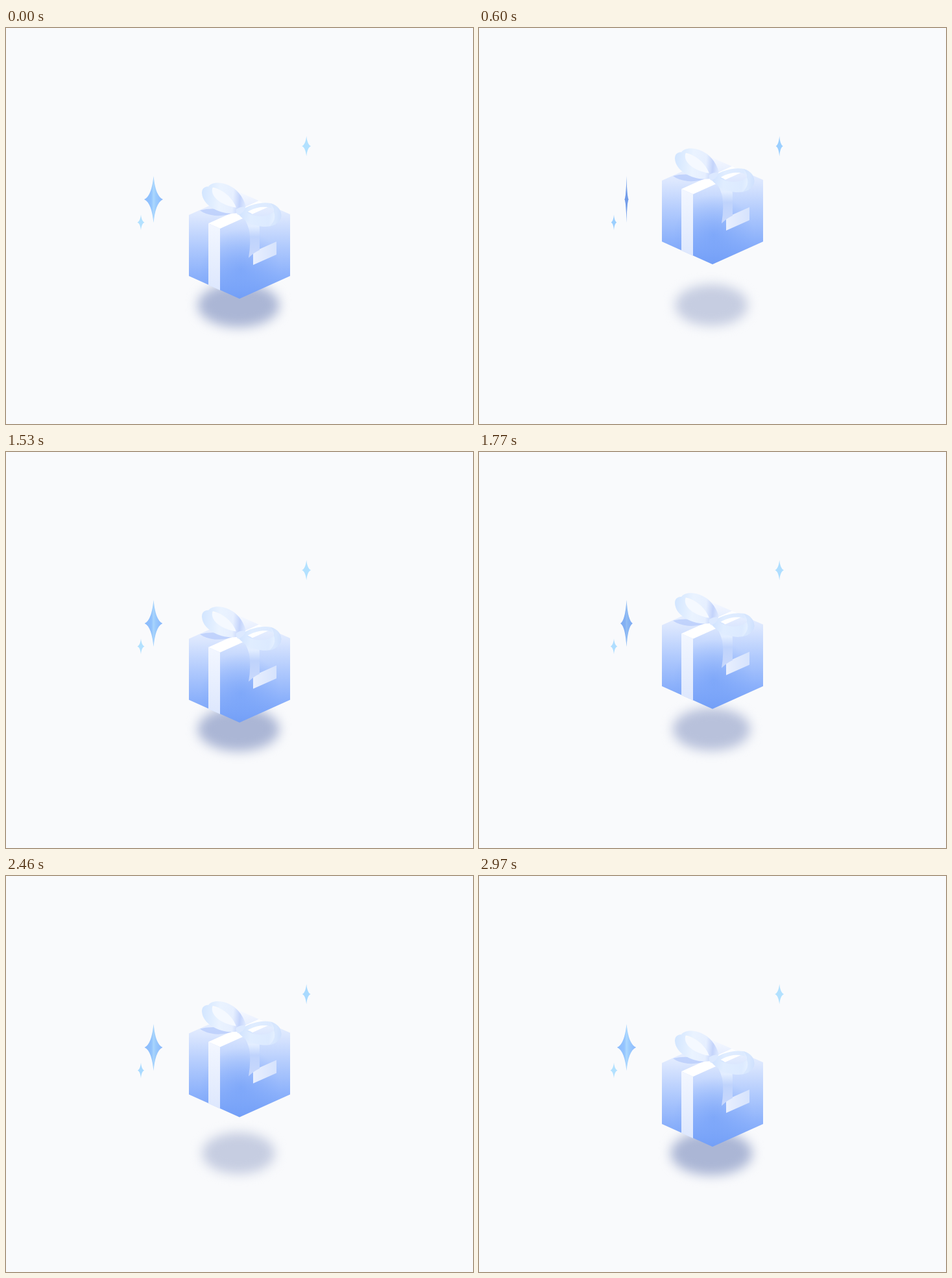
An HTML page that plays this animation: 720x610 px, repeating every 3000 ms.

```html
<!DOCTYPE html>
<html lang="en">
<head>
<meta charset="utf-8">
<title>Floating gift</title>
<style>
  html, body { margin: 0; width: 100%; height: 100%; overflow: hidden; background: #f9fafc; }
  svg { display: block; width: 720px; height: 610px; }
</style>
</head>
<body>
<svg viewBox="0 0 720 610">
  <defs>
    <filter id="soft" x="-40%" y="-60%" width="180%" height="220%" color-interpolation-filters="sRGB">
      <feGaussianBlur stdDeviation="8.5"/>
    </filter>
    <linearGradient id="body" gradientUnits="userSpaceOnUse" x1="0" y1="253" x2="0" y2="417">
      <stop offset="0" stop-color="#f5f8ff"/>
      <stop offset=".22" stop-color="#dce7fe"/>
      <stop offset=".5" stop-color="#b2cbfd"/>
      <stop offset=".78" stop-color="#8cb1fb"/>
      <stop offset="1" stop-color="#739ff7"/>
    </linearGradient>
    <radialGradient id="glow" gradientUnits="userSpaceOnUse" cx="362" cy="372" r="62">
      <stop offset="0" stop-color="#6f9df8" stop-opacity=".55"/>
      <stop offset="1" stop-color="#6f9df8" stop-opacity="0"/>
    </radialGradient>
    <linearGradient id="strip" x1="0" y1="0" x2="0" y2="1">
      <stop offset="0" stop-color="#f3f7ff"/>
      <stop offset="1" stop-color="#dde7fd"/>
    </linearGradient>
    <linearGradient id="tag" x1="0" y1="0" x2="1" y2="0">
      <stop offset="0" stop-color="#e8effe"/>
      <stop offset="1" stop-color="#d6e3fd"/>
    </linearGradient>
    <linearGradient id="tail" x1="0" y1="0" x2="0" y2="1">
      <stop offset="0" stop-color="#d4e5ff"/>
      <stop offset=".32" stop-color="#e3eeff"/>
      <stop offset=".55" stop-color="#bfd3fc"/>
      <stop offset="1" stop-color="#c8d8fc"/>
    </linearGradient>
    <linearGradient id="loopL" gradientUnits="userSpaceOnUse" x1="302" y1="262" x2="370" y2="268">
      <stop offset="0" stop-color="#d3e6ff"/>
      <stop offset=".4" stop-color="#eaf3ff"/>
      <stop offset=".7" stop-color="#e6efff"/>
      <stop offset=".86" stop-color="#c3d3fb"/>
      <stop offset="1" stop-color="#dfeaff"/>
    </linearGradient>
    <linearGradient id="loopR" gradientUnits="userSpaceOnUse" x1="358" y1="282" x2="425" y2="290">
      <stop offset="0" stop-color="#cfe2ff"/>
      <stop offset=".3" stop-color="#e0edff"/>
      <stop offset=".72" stop-color="#dceaff"/>
      <stop offset=".86" stop-color="#e6f1ff"/>
      <stop offset="1" stop-color="#c6dafc"/>
    </linearGradient>
    <linearGradient id="shine">
      <stop offset="0" stop-color="#8fbfff"/>
      <stop offset=".38" stop-color="#96c7ff"/>
      <stop offset=".5" stop-color="#b0dcff"/>
      <stop offset=".62" stop-color="#a0d0ff"/>
      <stop offset="1" stop-color="#8dbbff"/>
    </linearGradient>
    <path id="star" d="M0-36C2-18 6-4 15.5 0C6 4 2 18 0 36C-2 18-6 4-15.5 0C-6-4-2-18 0-36Z"/>
  </defs>

  <ellipse id="shadow" cx="358.5" cy="427" rx="63" ry="34" filter="url(#soft)"/>

  <g id="gift">
    <path id="box" d="M282 288L360 253L438 287V382L360 417L282 382Z" fill="url(#body)"/>
    <path d="M282 288L360 253L438 287V382L360 417L282 382Z" fill="url(#glow)"/>
    <path d="M312 301L390 266L408 274L330 309Z" fill="#fff"/>
    <path d="M312 301L330 309V404L312 396Z" fill="url(#strip)"/>
    <path d="M381 345L417 329V349L381 365Z" fill="url(#tag)"/>
    <path d="M299 281Q322 275 352 284Q340 290 322 289Q307 287 299 281Z" fill="#b9cefc" opacity=".8"/>
    <path d="M361 284Q374 278 387 294Q391 300 391 310V342Q382 346 374 354Q378 330 375 312Q371 296 361 284Z" fill="url(#tail)"/>
    <path d="M316 250C322 244 344 252 355 276C340 279 313 267 316 250Z" fill="#f5f9ff"/>
    <path d="M357 285C335 289 303 276 302 254C302 244 310 243 319 245C314 255 324 271 355 277C350 262 334 247 312 244
             C322 233 347 240 358 253Q366 262 370 275Z" fill="url(#loopL)"/>
    <path fill-rule="evenodd" d="M357 285C368 275 390 267 408 270C420 273 426 283 424 292C420 305 402 309 386 304C373 301 363 293 357 285Z
             M371 284C383 292 404 292 413 283C412 276 402 275 392 276Q380 278 371 284Z" fill="url(#loopR)"/>
    <path d="M408 270C420 273 426 283 424 292C421 301 413 305 406 306C414 299 416 291 413 283Q414 277 408 270Z" fill="#d2e3fe" opacity=".7"/>
    <path d="M355 279Q362 274 369 276Q368 284 358 288Q353 284 355 279Z" fill="#dce9ff"/>
  </g>

  <g id="big">
    <use href="#star" fill="url(#shine)"/>
    <use id="dim" href="#star" fill="#688fe2"/>
  </g>
  <use id="right" href="#star"/>
  <use id="left" href="#star"/>
</svg>
<script>
const $ = id => document.getElementById(id);
const LOOP = 3000, HOP = 1500, STEP = 30;

// [ms, value]
const lift = [[0, 0], [30, .3], [135, 6.5], [330, 28], [540, 50.5], [600, 53], [740, 55.5],
  [960, 45.5], [1080, 31], [1200, 11], [1320, 1], [1400, 0], [1500, 0]];
const spin = [[0, 21], [30, 27], [540, 84], [600, 101], [960, 154], [1080, 177], [1470, 199], [1500, 201]];
const twinkle = [[0, 1], [600, .8], [1080, .87], [1530, 1], [2040, .92], [2460, .92], [2970, 1], [3000, 1]];

// Smooth curve through the table's points
function curve(table, t) {
  const last = table.length - 1;
  let i = 0;
  while (i < last - 1 && t >= table[i + 1][0]) i++;
  const slope = k => {
    const a = table[Math.max(k - 1, 0)], b = table[Math.min(k + 1, last)];
    return (b[1] - a[1]) / (b[0] - a[0]);
  };
  const [t0, v0] = table[i], [t1, v1] = table[i + 1];
  const d = t1 - t0, s = (t - t0) / d, q = s * s * (3 - 2 * s);
  return v0 + (v1 - v0) * q
    + d * slope(i) * s * (1 - s) ** 2
    - d * slope(i + 1) * s * s * (1 - s);
}

function mix(a, b, k) {
  return `rgb(${a.map((v, i) => Math.round(v + (b[i] - v) * k))})`;
}

function place(id, x, y, sx, sy) {
  $(id).setAttribute('transform', `translate(${x} ${y}) scale(${sx} ${sy})`);
}

function draw(t) {
  const p = t % HOP;
  const up = curve(lift, p);
  $('gift').setAttribute('transform', `translate(0 ${-up})`);

  const high = Math.min(1, up / 45);
  const shadow = $('shadow');
  shadow.setAttribute('rx', 63 - 7 * high);
  shadow.setAttribute('ry', 34 - 2 * high);
  shadow.setAttribute('fill', mix([171, 182, 213], [198, 205, 225], high));

  const turn = Math.abs(Math.cos(curve(spin, p) * Math.PI / 180));
  place('big', 227.5, 264, Math.max(turn, .08), 1);
  $('dim').setAttribute('opacity', 1 - turn);

  const w = curve(twinkle, t);
  const tint = mix([155, 207, 255], [178, 225, 255], (w - .8) / .2);
  for (const [id, x, y, size] of [['right', 463.2, 182, .43], ['left', 208, 299.5, .33]]) {
    place(id, x, y, size * w * 1.06, size);
    $(id).setAttribute('fill', tint);
  }
}

const start = performance.now();
function tick() {
  const t = (performance.now() - start) % LOOP;
  draw(Math.floor(t / STEP) * STEP);
  requestAnimationFrame(tick);
}
tick();
</script>
</body>
</html>
```
